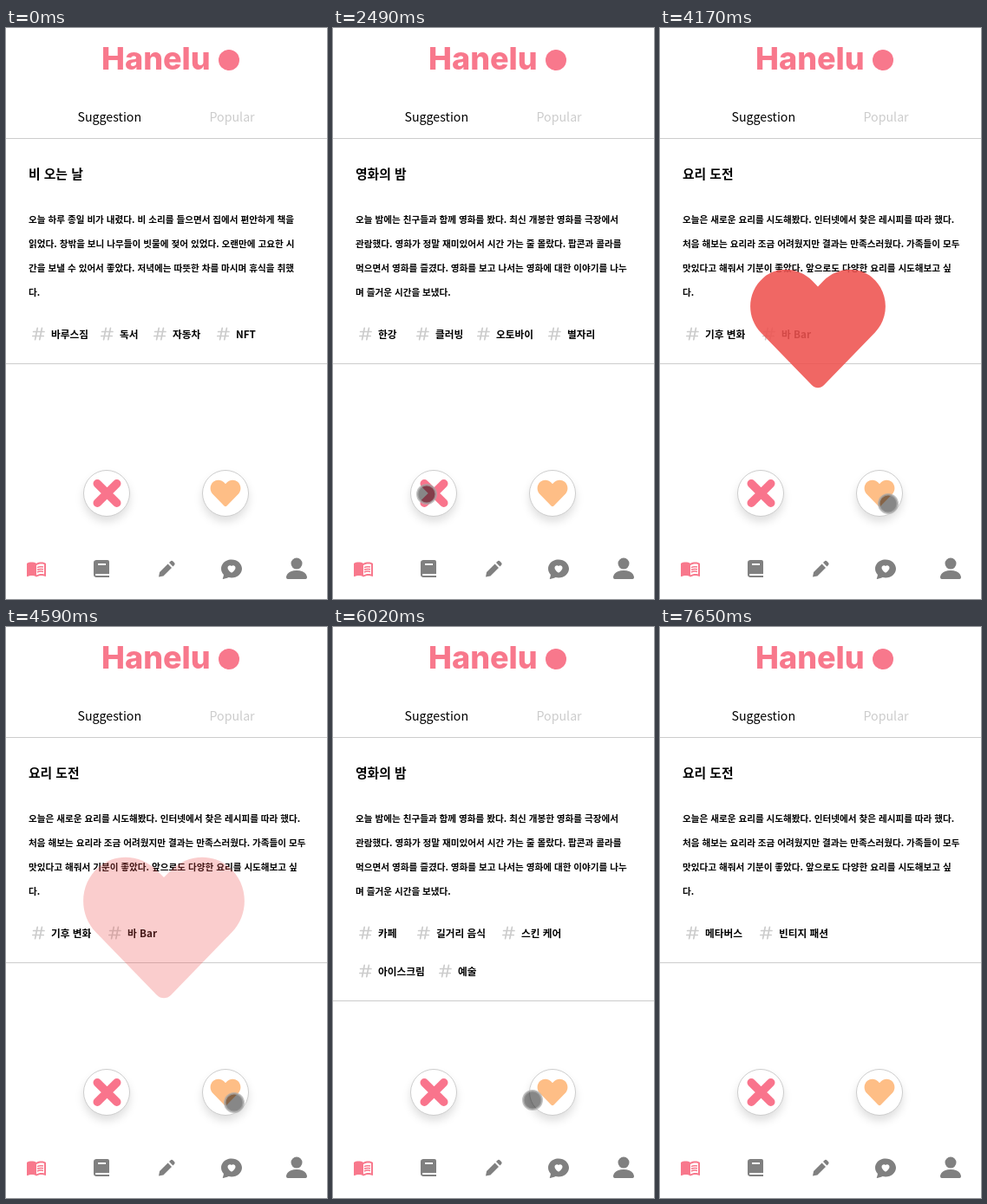
Animation of 370x659 px, one loop 7.75 s. Source, as an HTML page:

```html
<!DOCTYPE html>
<html lang="ko">
<head>
<meta charset="utf-8">
<title>Diary cards</title>
<style>
  html, body { margin: 0; width: 100%; height: 100%; overflow: hidden; background: #fff; }
  svg { display: block; width: 370px; height: 659px; font-family: "Noto Sans CJK KR", "Noto Sans CJK", sans-serif; }
  .logo { font: 800 36px Inter, sans-serif; }
  .tab { font-size: 14.2px; font-weight: 300; }
  .title { font-size: 14.8px; font-weight: 700; }
  .body { font-size: 10.6px; font-weight: 700; }
  .tag { font-size: 11.7px; font-weight: 700; }
  .rule { stroke: #ccc; }
  .button { fill: #fff; stroke: #ccc; filter: drop-shadow(0 6px 5px rgba(0, 0, 0, .12)); }
</style>
</head>
<body>
<svg viewBox="0 0 370 659">
  <defs>
    <path id="heartShape" transform="translate(-256 -256)" d="M462.3 62.6C407.5 15.9 326 24.3 275.7 76.2L256 96.5l-19.7-20.3C186.1 24.3 104.5 15.9 49.7 62.6c-62.8 53.6-66.1 149.8-9.9 207.9l193.5 199.8c12.5 12.9 32.8 12.9 45.3 0l193.5-199.8c56.3-58.1 53-154.3-9.8-207.9z"/>
    <path id="hash" d="M6.2 .8L3.6 14.2M11.4 .8L8.8 14.2M1.6 5H14M.8 10H13.2" fill="none" stroke="#ccc" stroke-width="1.7" stroke-linecap="round"/>
  </defs>

  <g fill="#f8788c">
    <text class="logo" x="110" y="48">Hanelu</text>
    <circle cx="257" cy="37" r="12"/>
  </g>
  <text class="tab" x="82.5" y="108">Suggestion</text>
  <text class="tab" x="234.5" y="108" fill="#ccc">Popular</text>
  <path class="rule" d="M0 127.5H370"/>

  <g id="card"></g>

  <circle class="button" cx="116" cy="537" r="26.5"/>
  <circle class="button" cx="253" cy="537" r="26.5"/>
  <path stroke="#f9748c" stroke-width="9.6" stroke-linecap="round" d="M105.3 525.8l22.4 22.4m0-22.4l-22.4 22.4"/>
  <use href="#heartShape" fill="#febe86" transform="translate(253 537) scale(.068)"/>

  <g fill="#808080">
    <path fill="#f8788c" transform="translate(23 612)" d="M21 5c-1.11-.35-2.33-.5-3.5-.5-1.95 0-4.05.4-5.5 1.5-1.45-1.1-3.55-1.5-5.5-1.5S2.45 4.9 1 6v14.65c0 .25.25.5.5.5.1 0 .15-.05.25-.05C3.1 20.45 5.05 20 6.5 20c1.95 0 4.05.4 5.5 1.5 1.35-.85 3.8-1.5 5.5-1.5 1.65 0 3.35.3 4.75 1.05.1.05.15.05.25.05.25 0 .5-.25.5-.5V6c-.6-.45-1.25-.75-2-1zm0 13.5c-1.1-.35-2.3-.5-3.5-.5-1.7 0-4.15.65-5.5 1.5V8c1.35-.85 3.8-1.5 5.5-1.5 1.2 0 2.4.15 3.5.5v11.5z"/>
    <path fill="none" stroke="#f8788c" stroke-width="1.5" d="M36 622.6q3-1.4 7-.6M36 625.3q3-1.4 7-.6M36 628q3-1.4 7-.6"/>
    <path transform="translate(98 612)" d="M6.012 18H21V4a2 2 0 0 0-2-2H6c-1.206 0-3 .799-3 3v14c0 2.201 1.794 3 3 3h15v-2H6.012C5.55 19.988 5 19.805 5 19s.55-.988 1.012-1zM8 6h9v2H8V6z"/>
    <path transform="translate(173 612.5)" d="M8.707 19.707L18 10.414 13.586 6l-9.293 9.293a1 1 0 0 0-.263.464L3 21l5.242-1.03a1 1 0 0 0 .465-.263zM21 7.414a2 2 0 0 0 0-2.828L19.414 3a2 2 0 0 0-2.828 0L15 4.586 19.414 9z"/>
    <path transform="translate(248 612) scale(1.5)" d="M8 15c4.418 0 8-3.134 8-7s-3.582-7-8-7-8 3.134-8 7c0 1.76.743 3.37 1.97 4.6-.097 1.016-.417 2.13-.771 2.966-.079.186.074.394.273.362 2.256-.37 3.597-.938 4.18-1.234A9.06 9.06 0 0 0 8 15Zm0-9.007c1.664-1.711 5.825 1.283 0 5.132-5.825-3.85-1.664-6.843 0-5.132Z"/>
    <path transform="translate(319 608) scale(2)" d="M3 14s-1 0-1-1 1-4 6-4 6 3 6 4-1 1-1 1H3zm5-5.7a3.25 3.25 0 1 0 0-6.5 3.25 3.25 0 0 0 0 6.5z"/>
  </g>

  <use id="pop" href="#heartShape" fill="#ef5350"/>
  <circle id="cursor" r="10.7" stroke="#aaa" stroke-opacity=".7" stroke-width="2.6"/>
</svg>
<script>
const LOOP = 7750, POP_TIME = 700;
const $ = id => document.getElementById(id);

const movie = [
  '오늘 밤에는 친구들과 함께 영화를 봤다. 최신 개봉한 영화를 극장에서',
  '관람했다. 영화가 정말 재미있어서 시간 가는 줄 몰랐다. 팝콘과 콜라를',
  '먹으면서 영화를 즐겼다. 영화를 보고 나서는 영화에 대한 이야기를 나누',
  '며 즐거운 시간을 보냈다.'];
const cooking = [
  '오늘은 새로운 요리를 시도해봤다. 인터넷에서 찾은 레시피를 따라 했다.',
  '처음 해보는 요리라 조금 어려웠지만 결과는 만족스러웠다. 가족들이 모두',
  '맛있다고 해줘서 기분이 좋았다. 앞으로도 다양한 요리를 시도해보고 싶',
  '다.'];

// Tags are rows of [x, label].
const cards = [
  { at: 0, title: '비 오는 날', lines: [
      '오늘 하루 종일 비가 내렸다. 비 소리를 들으면서 집에서 편안하게 책을',
      '읽었다. 창밖을 보니 나무들이 빗물에 젖어 있었다. 오랜만에 고요한 시',
      '간을 보낼 수 있어서 좋았다. 저녁에는 따뜻한 차를 마시며 휴식을 취했',
      '다.'],
    tags: [[[52, '바루스짐'], [131, '독서'], [192, '자동차'], [265, 'NFT']]] },
  { at: 1040, title: '가족 시간', lines: [
      '오늘은 가족 모임이 있었다. 오랜만에 가족들이 모두 모여서 즐거운 시간을',
      '보냈다. 맛있는 음식을 나눠 먹으며 여러 가지 이야기를 나눴다. 가족들',
      '과 함께 시간을 보내니 마음이 따뜻해졌다. 저녁에는 가족들과 함께 산',
      '책을 했다.'],
    tags: [[[52, '전시회'], [126, '길거리 음식'], [223, '브런치'], [295, '주짓수']]] },
  { at: 2430, title: '영화의 밤', lines: movie,
    tags: [[[52, '한강'], [118, '클러빙'], [188, '오토바이'], [270, '별자리']]] },
  { at: 4120, title: '요리 도전', lines: cooking,
    tags: [[[52, '기후 변화'], [140, '바 Bar']]] },
  { at: 5180, title: '영화의 밤', lines: movie,
    tags: [[[52, '카페'], [119, '길거리 음식'], [217, '스킨 케어']], [[52, '아이스크림'], [144, '예술']]] },
  { at: 6900, title: '요리 도전', lines: cooking,
    tags: [[[52, '메타버스'], [137, '빈티지 패션']]] }
];

const pops = [4090, 5150, 6890];
const presses = [[830, 1010], [2390, 2490], [3980, 4090], [5040, 5150], [6780, 6890]];

// Cursor stops: time, x, y.
const stops = [
  [50, 195, 672], [420, 150, 590], [810, 108, 538], [2640, 108, 538], [2710, 114, 536],
  [2890, 115, 536], [3180, 190, 531], [3400, 254, 545], [3610, 263, 549], [5550, 263, 549],
  [6020, 230, 546], [6180, 228, 546], [6890, 228, 546], [7100, 210, 545], [7560, 341, 672]
];

const text = (cls, x, y, s) => `<text class="${cls}" x="${x}" y="${y}">${s}</text>`;

function drawCard({ title, lines, tags }) {
  const end = 343.5 + 44 * tags.length;
  $('card').innerHTML = text('title', 26, 174, title) +
    lines.map((s, i) => text('body', 26, 225 + 28 * i, s)).join('') +
    tags.map((row, i) => row.map(([x, s]) =>
      `<use href="#hash" x="${x - 22}" y="${345.5 + 44 * i}"/>` + text('tag', x, 357.5 + 44 * i, s)
    ).join('')).join('') +
    `<path class="rule" d="M0 ${end}H370"/>`;
}

function cursorAt(t) {
  const i = stops.findIndex(s => s[0] > t);
  if (i < 1) return null;
  const [t0, x0, y0] = stops[i - 1], [t1, x1, y1] = stops[i];
  const p = (t - t0) / (t1 - t0);
  return [x0 + (x1 - x0) * p, y0 + (y1 - y0) * p];
}

let shown;
function frame(now) {
  const t = now % LOOP;

  const card = cards.findLast(c => c.at <= t);
  if (card !== shown) drawCard(shown = card);

  const start = pops.find(s => t >= s && t < s + POP_TIME);
  const p = start === undefined ? 1 : (t - start) / POP_TIME;
  $('pop').setAttribute('transform', `translate(182 347) scale(${(150 + 50 * p) / 512})`);
  $('pop').setAttribute('opacity', 1 - p);

  const pos = cursorAt(t);
  const pressed = presses.some(([a, b]) => t >= a && t < b);
  $('cursor').setAttribute('opacity', pos ? 1 : 0);
  if (pos) $('cursor').setAttribute('transform', `translate(${pos})`);
  $('cursor').setAttribute('fill-opacity', pressed ? .58 : .47);

  requestAnimationFrame(frame);
}
frame(performance.now());
</script>
</body>
</html>
```
